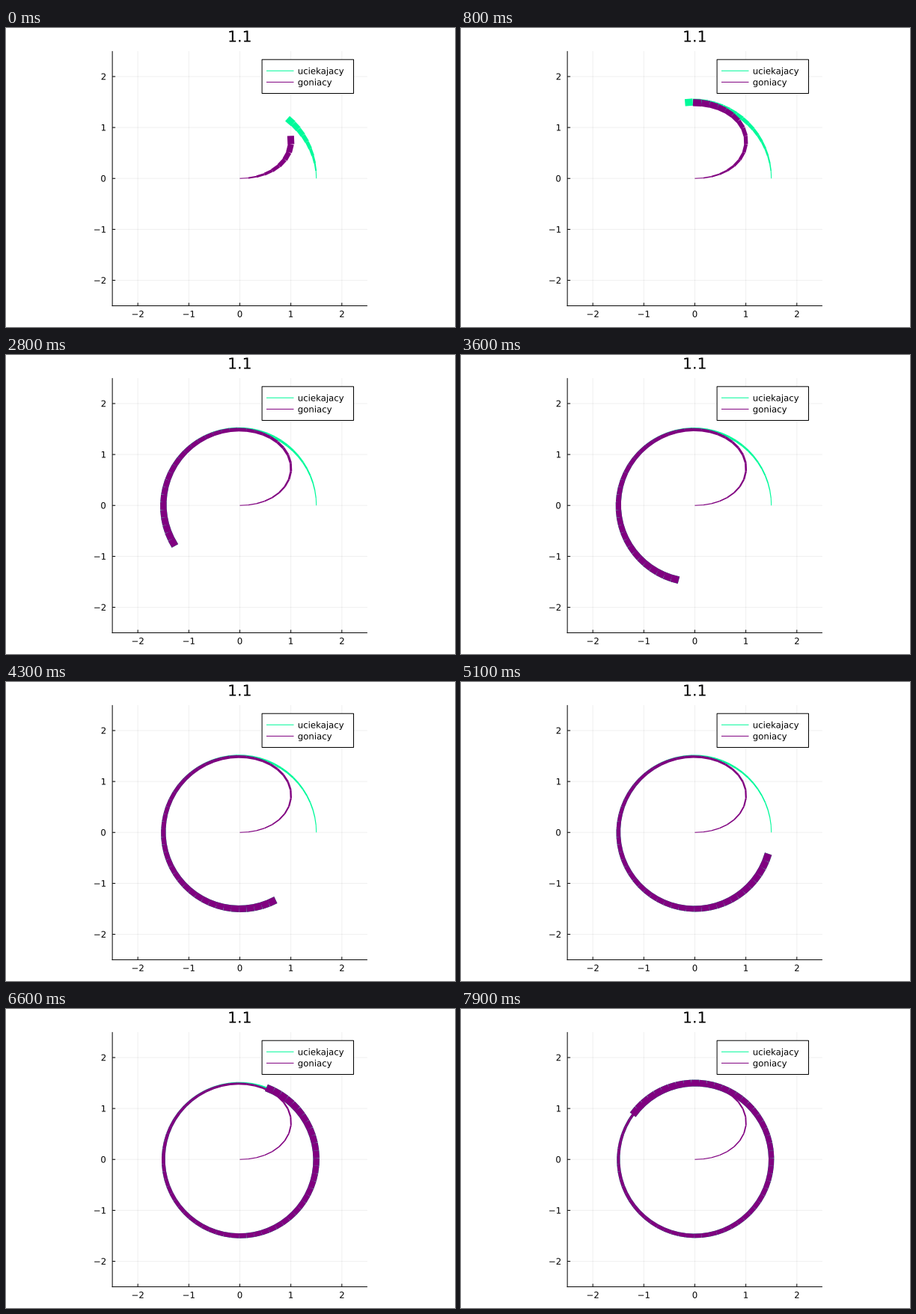
A matplotlib script that plays this animation: 600x400 px, repeating every 8 s.

```python
import numpy as np
import matplotlib.pyplot as plt
from matplotlib.animation import FuncAnimation
from matplotlib.collections import LineCollection
from matplotlib.patches import PathPatch, Rectangle
from matplotlib.textpath import TextPath
from matplotlib.transforms import Affine2D

plt.rcParams["font.family"] = "DejaVu Sans"

W, H, DPI = 600, 400, 100
PT = 72 / DPI                       # points per pixel
X0, Y0, UNIT = 312.5, 201.25, 68.15  # data origin and scale in pixels
FRAMES, FIRST = 80, 10              # frames, points in the opening trail
RADIUS, DT, RATIO = 1.5, 0.1, 1.1   # evader circle, sample step, speed ratio
SUB = 200                           # integration steps per sample
GREEN, PURPLE = "mediumspringgreen", "purple"


def to_px(points):
    return np.asarray(points) * [UNIT, -UNIT] + [X0, Y0]


def evader(t):
    return RADIUS * np.stack([np.cos(t), np.sin(t)], axis=-1)


def chase(n):
    """Pursuit curve: always heading for the evader at constant speed."""
    h = DT / SUB
    step = RATIO * RADIUS * h
    pos, path = np.zeros(2), [np.zeros(2)]
    for k in range(1, (n - 1) * SUB + 1):
        gap = evader(k * h) - pos
        dist = np.hypot(*gap)
        pos = pos + gap * min(1, step / max(dist, 1e-12))
        if k % SUB == 0:
            path.append(pos)
    return np.array(path)


count = FIRST + FRAMES - 1
runner = to_px(evader(np.arange(count) * DT))
hunter = to_px(chase(count))

fig = plt.figure(figsize=(W / DPI, H / DPI), dpi=DPI, facecolor="white")
ax = fig.add_axes([0, 0, 1, 1])
ax.set_xlim(0, W)
ax.set_ylim(H, 0)
ax.axis("off")


def line(xs, ys, color="black", z=2, **kw):
    ax.plot(xs, ys, color=color, lw=PT, zorder=z, solid_capstyle="butt",
            snap=False, **kw)


def label(x, y, s, size=11.7, ha="center"):
    """Outlined text with its baseline at y, free of pixel rounding."""
    path = TextPath((0, 0), s, size=size)
    box = path.get_extents()
    shift = {"left": 0, "center": (box.x0 + box.x1) / 2, "right": box.x1}[ha]
    place = Affine2D().scale(1, -1).translate(x - shift, y)
    ax.add_patch(PathPatch(place.transform_path(path), fc="black", lw=0,
                           zorder=8, snap=False))


left, top = to_px([-2.5, 2.5])
right, bottom = to_px([2.5, -2.5])

for v in range(-2, 3):
    x, y = to_px([v, v])
    line([x, x], [top, bottom], z=1, alpha=0.06)
    line([left, right], [y, y], z=1, alpha=0.06)
    line([x, x], [bottom, bottom - 4])
    line([left, left + 4], [y, y])
    name = str(v).replace("-", "\u2212")
    label(x, 386.8, name)
    label(133, y + 4.3, name, ha="right")

line([left, left], [top, bottom + 0.5])
line([left - 0.5, right], [bottom, bottom])
label(X0, 18.5, "1.1", size=20.5)

# legend: two entries in three equal rows
LEG_TOP, ROW = 42.2, 15.1
ax.add_patch(Rectangle((342.1, LEG_TOP), 122.4, 3 * ROW, fc="white",
                       ec="black", lw=PT, zorder=6, snap=False))
for k, (color, name) in enumerate([(GREEN, "uciekajacy"), (PURPLE, "goniacy")]):
    y = LEG_TOP + (k + 1) * ROW
    line([348, 384.5], [y, y], color, z=7)
    label(389.8, y + 4.3, name, ha="left")


def trail(color, z):
    return ax.add_collection(
        LineCollection([], colors=color, capstyle="butt", zorder=z,
                       snap=False),
        autolim=False)


trails = [(trail(GREEN, 3), runner), (trail(PURPLE, 4), hunter)]


def draw(i):
    n = FIRST + i
    widths = np.linspace(1, 10, n)[:-1] * PT
    for coll, path in trails:
        coll.set_segments(np.stack([path[:n - 1], path[1:n]], axis=1))
        coll.set_linewidths(widths)
    return [coll for coll, _ in trails]


anim = FuncAnimation(fig, draw, frames=FRAMES, interval=100, repeat=True,
                     repeat_delay=0, blit=False)
plt.show()
```
